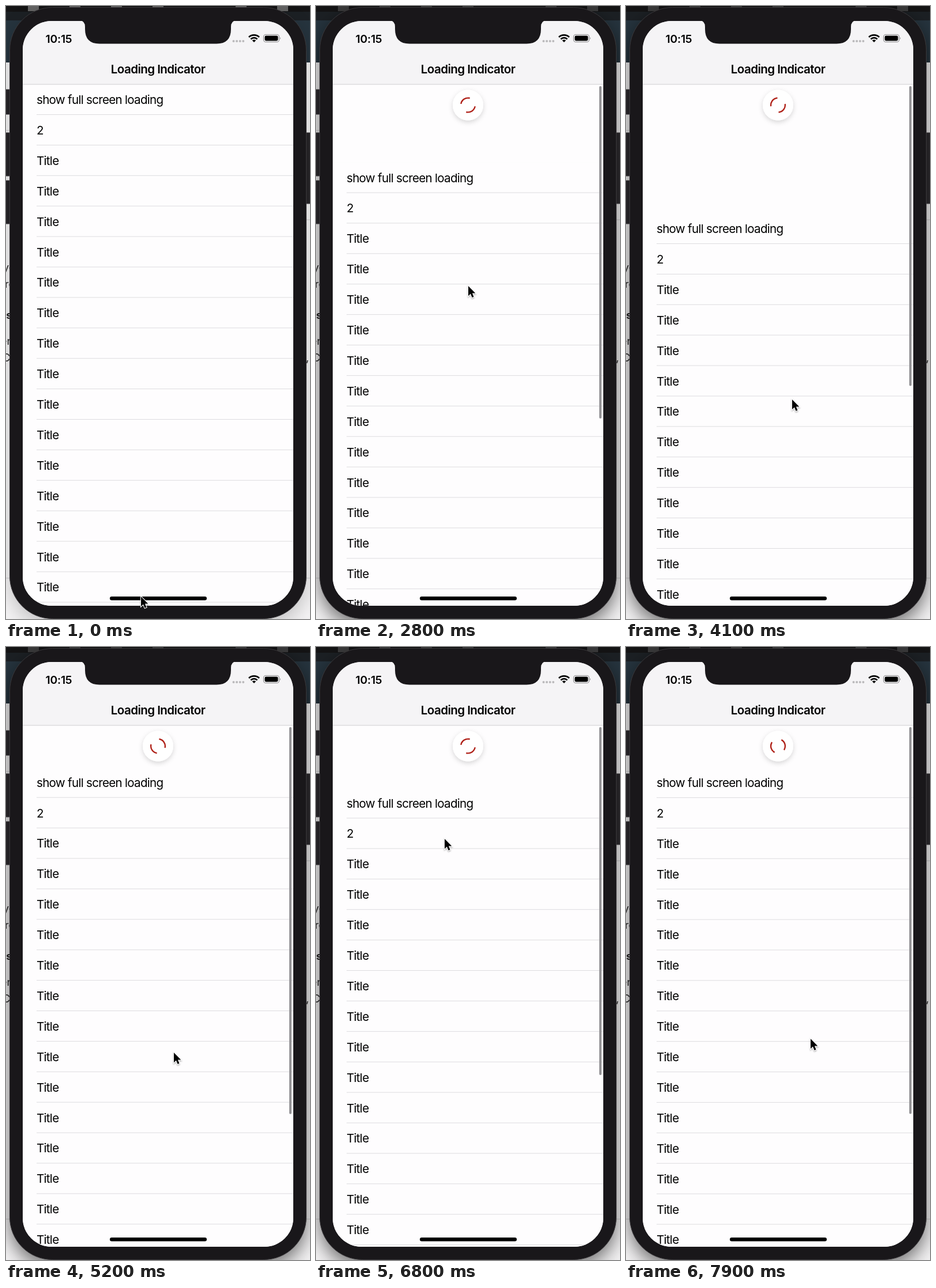
These frames come from a looping animation (527 px wide and 1064 px high, 8 s). An HTML page:

```html
<!DOCTYPE html>
<html lang="en">
<head>
<meta charset="utf-8">
<title>Loading Indicator</title>
<style>
html, body { margin: 0; width: 100%; height: 100%; overflow: hidden; background: #f4f3f4; }
svg { display: block; width: 527px; height: 1064px; }
text { font-family: Inter, "Liberation Sans", sans-serif; font-optical-sizing: none; }
.row text { font-size: 20.6px; letter-spacing: -.72px; }
.bold { font-weight: 600; text-anchor: middle; }
.page { font: 18px "Open Sans", sans-serif; fill: #222; }
</style>
</head>
<body>
<svg viewBox="0 0 527 1064">
  <defs>
    <clipPath id="screen"><rect x="29" y="26" width="469" height="1015" rx="50"/></clipPath>
    <clipPath id="table"><rect x="29" y="136.5" width="469" height="905"/></clipPath>
    <filter id="soft" x="-20%" y="-20%" width="140%" height="140%"><feGaussianBlur stdDeviation="16"/></filter>
    <filter id="lift" x="-50%" y="-50%" width="200%" height="200%">
      <feDropShadow dx="0" dy="3" stdDeviation="4.5" flood-opacity=".16"/>
    </filter>
    <filter id="drop" x="-50%" y="-50%" width="200%" height="200%">
      <feDropShadow dx="0" dy="1.5" stdDeviation="1" flood-opacity=".35"/>
    </filter>
  </defs>

  <!-- page behind the phone -->
  <rect width="527" height="1064" fill="#f4f3f4"/>
  <g class="page">
    <path d="M0 216H10M517 371H527M0 993H70M457 993H527" stroke="#cbcacc"/>
    <text x="-5" y="460">ye</text>
    <text x="-2" y="489">re</text>
    <text x="-11" y="543" font-weight="700">ns</text>
    <text x="-9" y="588">er</text>
    <text x="-6" y="617">C</text>
    <text x="520" y="617">,</text>
  </g>
  <rect width="527" height="98" fill="#26343e"/>
  <rect width="527" height="25" fill="#1c2024"/>
  <rect width="527" height="10" fill="#141415"/>
  <g id="icons" fill="#777"></g>
  <rect id="shade" x="6" y="15" width="515" height="1061" rx="74" filter="url(#soft)"/>

  <!-- phone -->
  <g fill="#242225" stroke="#3a383b">
    <rect x="-3" y="145" width="14" height="43" rx="3"/>
    <rect x="-3" y="220" width="14" height="75" rx="3"/>
    <rect x="-3" y="303" width="14" height="75" rx="3"/>
    <rect x="516" y="220" width="14" height="123" rx="3"/>
    <rect x="6.5" y="2.5" width="514" height="1061" rx="74" fill="#19171a"/>
  </g>

  <g clip-path="url(#screen)">
    <rect x="29" y="26" width="469" height="1015" fill="#fefdfe"/>
    <g clip-path="url(#table)">
      <g id="spinner">
        <circle cx="263.5" cy="172" r="26.5" fill="#fff" filter="url(#lift)"/>
        <circle id="arcs" cx="263.5" cy="172" r="12.4" fill="none" stroke="#b0231a" stroke-width="2.4" pathLength="360" stroke-dasharray="95 85"/>
      </g>
      <g id="rows"><rect x="29" y="136" width="469" height="1000" fill="#fefdfe"/></g>
    </g>
    <rect id="bar" x="491" y="139" width="4" rx="2" fill="#949396"/>
    <rect x="29" y="26" width="469" height="110" fill="#f5f4f6"/>
    <path d="M29 136H498" stroke="#cfced1"/>
    <rect x="180" y="1025" width="168" height="6.4" rx="3.2"/>
  </g>
  <path d="M128 25Q137 26 137 36V40Q137 65.500 162 65.500H365Q390 65.500 390 40V36Q390 26 399 25Z" fill="#19171a"/>

  <text class="bold" x="91.500" y="63.500" font-size="19.300" letter-spacing="-.2">10:15</text>
  <text class="bold" x="263.500" y="117" font-size="20.600" letter-spacing="-.58">Loading Indicator</text>

  <!-- status icons -->
  <path d="M394.500 61H412" stroke="#bab9bb" stroke-width="4" stroke-linecap="round" stroke-dasharray="0 5.600"/>
  <g fill="none" stroke="#000" stroke-width="2.700">
    <path d="M421 54a12.800 12.800 0 0 1 18 0"/>
    <path d="M424.400 57.500a8 8 0 0 1 11.200 0"/>
  </g>
  <path d="M430 63l-3.200-3.200a4.500 4.500 0 0 1 6.400 0z"/>
  <rect x="446.500" y="49.500" width="27" height="13" rx="4" fill="none" stroke="#8f8e91" stroke-width="1.200"/>
  <rect x="448.500" y="51.500" width="23" height="9" rx="2.400"/>
  <path d="M475 54q2 2 0 4z" fill="#8f8e91"/>

  <path id="cursor" d="M0 0V17.200L3.900 13.600 6.600 20 9.500 18.800 6.900 12.500H12.300Z" stroke="#fff" stroke-width="2" paint-order="stroke" filter="url(#drop)"/>
</svg>
<script>
const LOOP = 8000, STEP = 100, PITCH = 52.9, INSET = 72.5;
const el = id => document.getElementById(id);

// time, x, y of the pointer tip
const pointer = [
  [0, 234, 1025], [400, 322, 386], [700, 322, 386], [1300, 290, 420], [1400, 290, 420],
  [2000, 262, 337], [2200, 262, 215], [2800, 264, 486], [4100, 288, 683], [4500, 291, 704],
  [5900, 291, 704], [6300, 222, 160], [6500, 222, 160], [6800, 223, 333],
  [7200, 310, 640], [7400, 320, 680]
];
// time, distance of the list while it is dragged
const drag = [[2200, 0], [2800, 135.5], [4100, 224], [4500, 229], [6500, 0], [6800, 108.5], [7300, 226]];

function at(keys, t) {
  const i = keys.findIndex(k => k[0] > t);
  if (i < 0) return keys[keys.length - 1].slice(1);
  if (i === 0) return keys[0].slice(1);
  const a = keys[i - 1], b = keys[i], p = (t - a[0]) / (b[0] - a[0]);
  return a.slice(1).map((v, j) => v + (b[j + 1] - v) * p);
}

const settle = (from, to, ms) => to + (from - to) * Math.exp(-ms / 102);

function offset(t) {
  if (t > 7300) return settle(226, INSET, t - 7300);
  if (t >= 6500) return at(drag, t)[0];
  if (t > 5500) return settle(INSET, 0, t - 5500);
  if (t > 4500) return settle(229, INSET, t - 4500);
  return at(drag, t)[0];
}

// share of the inset held open while loading
function held(t, o) {
  if (t >= 7000 || (t >= 3000 && t <= 5500)) return 1;
  return t > 5500 && t < 6500 ? o / INSET : 0;
}

function draw(t) {
  const o = offset(t), [x, y] = at(pointer, t), active = t >= 700;
  el("rows").setAttribute("transform", `translate(0 ${o})`);
  el("cursor").setAttribute("transform", `translate(${x} ${y})`);
  el("arcs").setAttribute("transform", `rotate(${10 + .262 * ((t + 1200) % 4000)} 263.5 172)`);
  el("bar").setAttribute("height", 712.5 + 32 * held(t, o) - o);
  el("bar").style.display = el("spinner").style.display = t > 2200 ? "" : "none";
  el("shade").setAttribute("opacity", active ? .54 : .2);
  el("icons").setAttribute("opacity", active ? .4 : .8);
}

let html = "";
for (let i = 0; i < 17; i++) {
  const label = ["show full screen loading", "2"][i] || "Title", y = i * PITCH;
  html += `<g class="row"><text x="53" y="${170 + y}">${label}</text>
    <path d="M53 ${188.5 + y}H498" stroke="#dddcdf"/></g>`;
}
el("rows").insertAdjacentHTML("beforeend", html);
el("icons").innerHTML = [38, 110, 182, 254, 398, 470]
  .map(x => `<rect x="${x}" width="19" height="9"/>`).join("");

function tick() {
  draw(Math.floor(performance.now() % LOOP / STEP) * STEP);
  requestAnimationFrame(tick);
}
tick();
</script>
</body>
</html>
```
